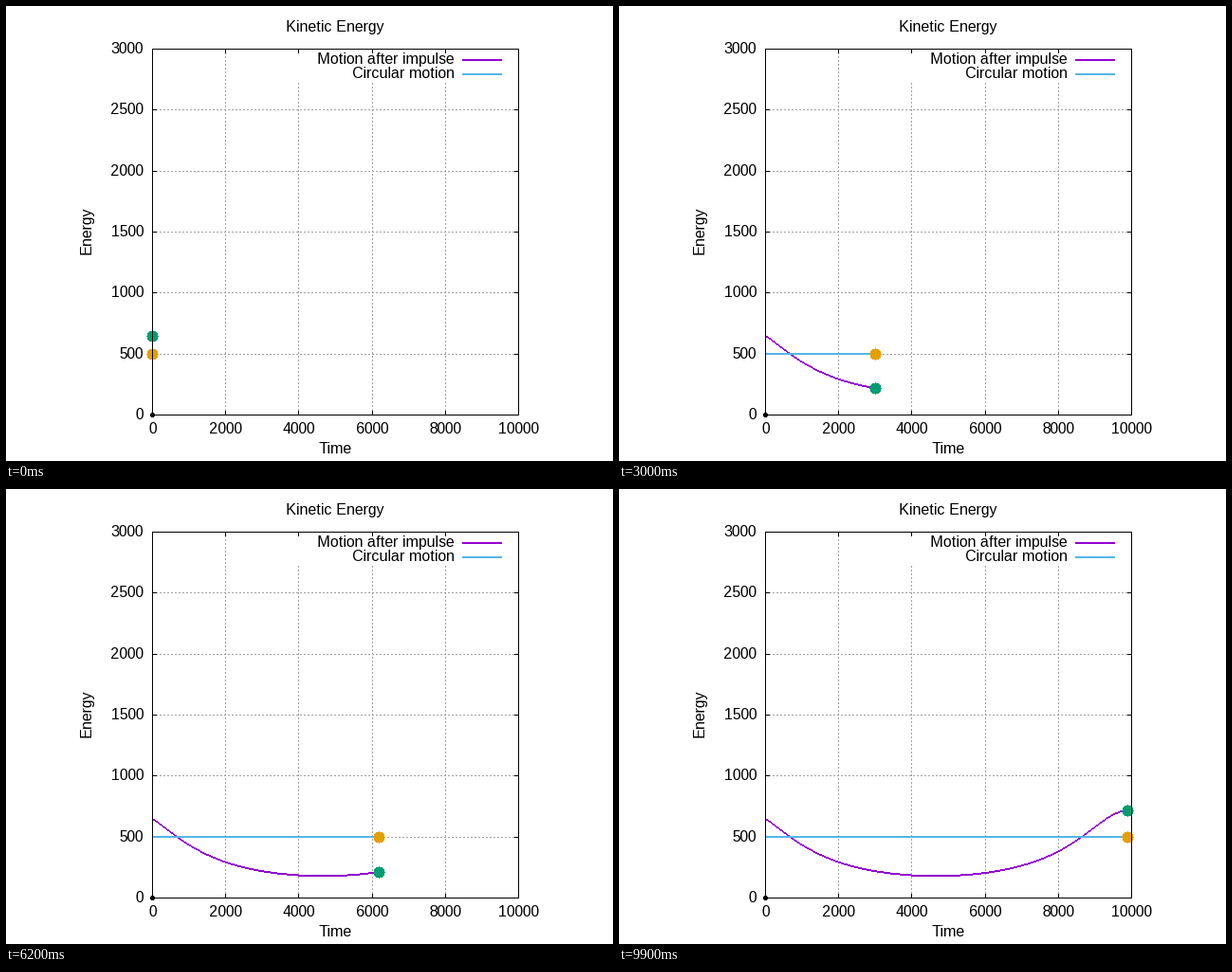
A matplotlib script that plays this animation: 640x480 px, repeating every 10000 ms.

```python
import matplotlib.pyplot as plt
import numpy as np
from matplotlib.animation import FuncAnimation
from matplotlib.patches import Circle

DPI = 100
PX = 72 / DPI                      # one pixel in points
LEFT, RIGHT, TOP, BOTTOM = 154, 540, 45, 431
SPAN = RIGHT - LEFT
T_MAX, E_MAX = 10000, 3000
FRAMES, STEP = 100, 100
PURPLE, BLUE, GREEN, ORANGE = "#9400d3", "#56b4e9", "#009e73", "#e69f00"
CRISP = dict(antialiased=False, snap=False)

plt.rcParams.update({
    "font.family": "Liberation Sans",
    "font.size": 16 * PX,
    "text.hinting_factor": 2,      # spaces glyphs on half pixels
    "lines.solid_capstyle": "butt",
})
fig = plt.figure(figsize=(6.4, 4.8), dpi=DPI, facecolor="white")
ax = fig.add_axes([0, 0, 1, 1])
ax.set_xlim(0, 640)
ax.set_ylim(480, 0)
ax.axis("off")


def to_x(t):
    return np.floor(LEFT + SPAN * np.asarray(t) / T_MAX + 0.5).astype(int)


def to_y(e):
    return BOTTOM - np.floor(SPAN * np.asarray(e) / E_MAX + 0.5).astype(int)


def line(xs, ys, color="black", width=1, z=1, **kw):
    ax.plot(xs, ys, color=color, lw=width * PX, zorder=z, **{**CRISP, **kw})


def label(x, y, text, ha="center", **kw):
    ax.text(x, y, text, ha=ha, va="baseline", zorder=6, **kw)


def dot(x, y, r, color, z):
    return ax.add_patch(Circle((x + 0.5, y + 0.5), r, fc=color, lw=0,
                               zorder=z, **CRISP))


def ribbon(first, rows):
    """Values, edges and baseline of a curve two pixels thick."""
    return rows + 1, first + np.arange(len(rows) + 1), rows - 1


def orbit_energy(t, v_rad=0.2, v_tan=np.sqrt(1.25)):
    """Kinetic energy on the ellipse that follows a kick to a circular orbit."""
    total = (v_rad**2 + v_tan**2) / 2 - 1
    a = -0.5 / total
    ecc = np.sqrt(1 - v_tan**2 / a)
    start = np.arccos((1 - 1 / a) / ecc)
    mean = start - ecc * np.sin(start) + t / 1000 / a**1.5
    anomaly = mean.copy()
    for _ in range(20):
        anomaly -= (anomaly - ecc * np.sin(anomaly) - mean) / (1 - ecc * np.cos(anomaly))
    return 1000 * (1 / (a * (1 - ecc * np.cos(anomaly))) + total)


# Grid, interrupted behind the legend
grid = dict(color="#a0a0a0", z=0, linestyle=(0, (2, 2)), antialiased=True)
for t in range(2000, T_MAX, 2000):
    x = to_x(t)
    line([x + 0.5] * 2, [BOTTOM, TOP if x < 290 else 81], **grid)
for e in range(500, E_MAX, 500):
    line([LEFT, RIGHT], [to_y(e) + 0.5] * 2, **grid)

# Ticks and their labels
for t in range(0, T_MAX + 1, 2000):
    x = to_x(t)
    line([x + 0.5] * 2, [BOTTOM, BOTTOM - 4])
    line([x + 0.5] * 2, [TOP, TOP + 5])
    label(x + 0.75, 451, str(t))
for e in range(0, E_MAX + 1, 500):
    y = to_y(e)
    line([LEFT, LEFT + 5], [y + 0.5] * 2)
    line([RIGHT - 4, RIGHT], [y + 0.5] * 2)
    label(145, y + 5, str(e), ha="right")

# Border lies over the curves
line(np.array([LEFT, RIGHT, RIGHT, LEFT, LEFT]) + 0.5,
     np.array([TOP, TOP, BOTTOM, BOTTOM, TOP]) + 0.5, z=5,
     solid_joinstyle="miter", solid_capstyle="projecting")

label(346.5, 27, "Kinetic Energy")
label(346.5, 472, "Time")
label(89, 237, "Energy", rotation=90, rotation_mode="anchor")
for text, y, color in (("Motion after impulse", 57, PURPLE),
                       ("Circular motion", 72, BLUE)):
    label(473, y + 4, text, ha="right")
    line([481, 523], [y, y], color, 2)

# Curves sampled once per pixel column
columns = np.arange(LEFT, RIGHT + 1)
times = (columns - LEFT) * T_MAX / SPAN
heads = to_x(np.arange(FRAMES) * STEP) - LEFT

tracks = []
for energy, line_color, dot_color, z in (
        (orbit_energy(times), PURPLE, GREEN, 2),
        (np.full(len(times), 500), BLUE, ORANGE, 2.5)):
    rows = to_y(energy)
    values, edges, base = ribbon(LEFT, rows[:1])
    trace = ax.stairs(values, edges, baseline=base, fill=True,
                      color=line_color, lw=0, zorder=z, **CRISP)
    tracks.append((rows, trace, dot(LEFT, rows[0], 5.53, dot_color, z + 1)))
dot(LEFT, BOTTOM, 1.8, "black", 4)


def draw(i):
    head = heads[i]
    for rows, trace, marker in tracks:
        trace.set_data(*ribbon(LEFT, rows[:head + 1]))
        marker.set_center((columns[head] + 0.5, rows[head] + 0.5))
    return [artist for track in tracks for artist in track[1:]]


anim = FuncAnimation(fig, draw, frames=FRAMES, init_func=lambda: draw(0),
                     interval=STEP, repeat=True, repeat_delay=0)
plt.show()
```
